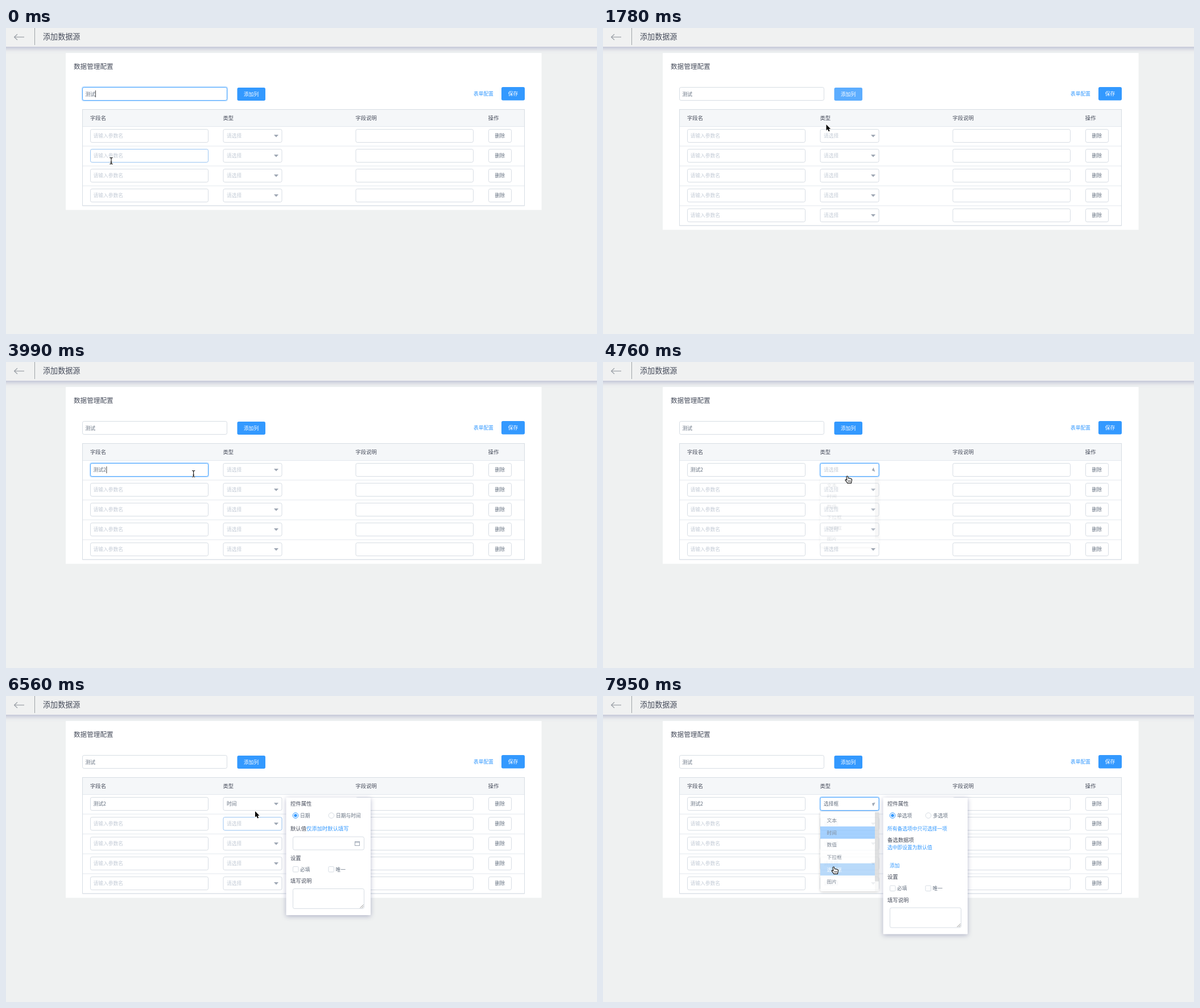
Recreate the animation shown at these times as an HTML page with a canvas. Size 1039 by 539 pixels, loop 8 s.

```html
<!DOCTYPE html>
<html lang="zh-CN">
<head>
<meta charset="utf-8">
<title>添加数据源</title>
<style>
html, body { margin: 0; width: 100%; height: 100%; overflow: hidden; background: #eff1f1; }
canvas { display: block; }
</style>
</head>
<body>
<canvas id="stage" width="1039" height="539"></canvas>
<script>
const W = 1039, H = 539, LOOP = 8000;
const screen2d = document.getElementById('stage').getContext('2d');
const layer = document.createElement('canvas');
layer.width = W;
layer.height = H;
const layer2d = layer.getContext('2d');
let g = screen2d;

const FONT = '"Noto Sans CJK SC", "Noto Sans CJK", sans-serif';
const BLUE = '#3399ff', HOVER = '#5cadff', LINE = '#d7dde4';
const TEXT = '#657180', TITLE = '#464c5b', HINT = '#c3cbd6', ARROW = '#9ea7b4';
const SMALL = 8.75, MID = 9.33;
const ITEMS = ['文本', '时间', '数值', '下拉框', '选择框', '图片'];
const ITEM_H = 22.4, MENU_TOP = 204;

// Screen refreshes: start, end, count
const REFRESH = [
  [0, 0, 1], [90, 90, 1], [290, 560, 4], [710, 1360, 8], [1510, 1510, 1],
  [1690, 2490, 10], [2570, 2660, 2], [2840, 2840, 1], [3010, 3010, 1],
  [3370, 3370, 1], [3640, 3640, 1], [3900, 4680, 10], [4760, 5490, 9],
  [5940, 6730, 10], [6820, 6900, 2], [7080, 7510, 6], [7690, 7690, 1], [7950, 7950, 1]
];

// Pointer path: time, x, y
const PATH = [
  [-100, 186, 246], [0, 185, 234], [200, 185, 234], [290, 196, 222], [380, 262, 188],
  [470, 350, 140], [560, 402, 112], [890, 424, 117], [1600, 425, 117], [1690, 415, 127],
  [1779, 392.5, 170], [1870, 386, 190], [2050, 360, 196], [2490, 312, 191],
  [3810, 312, 191], [3990, 330, 197], [4250, 385, 211], [4500, 425, 206],
  [4680, 430, 201], [4850, 430, 201], [5100, 424, 215], [5490, 414.5, 236],
  [5950, 414.5, 236], [6200, 425, 245], [6450, 436, 216], [6554, 438, 203],
  [6730, 436, 201], [6900, 432, 200], [7080, 432, 200], [7200, 428, 215],
  [7510, 407, 304], [7690, 406, 301]
];

const clamp = v => Math.max(0, Math.min(1, v));
const smooth = v => { v = clamp(v); return v * v * (3 - 2 * v); };
const inside = (p, x, y, w, h) => p.x >= x && p.x <= x + w && p.y >= y && p.y <= y + h;
const mix = (a, b, k) => {
  const ch = (s, i) => parseInt(s.slice(i, i + 2), 16);
  return `rgb(${[1, 3, 5].map(i => Math.round(ch(a, i) + (ch(b, i) - ch(a, i)) * k))})`;
};

function snap(t) {
  let shown = 0;
  for (const [a, b, n] of REFRESH) {
    if (t < a) break;
    const step = n > 1 ? (b - a) / (n - 1) : 1;
    shown = a + Math.min(n - 1, Math.floor((t - a) / step)) * step;
  }
  return shown;
}

function pointerAt(t) {
  let i = 1;
  while (i < PATH.length - 1 && PATH[i][0] < t) i++;
  const [t0, x0, y0] = PATH[i - 1], [t1, x1, y1] = PATH[i];
  const k = clamp((t - t0) / (t1 - t0));
  return { x: x0 + (x1 - x0) * k, y: y0 + (y1 - y0) * k };
}

const ramp = (t, on, off, d) => smooth((t - on) / d) - smooth((t - off) / d);
const openness = (t, d = 300) => ramp(t, 4674, 5955, d) + ramp(t, 7000, 7870, d);

function fill(x, y, w, h, color, r = 0) {
  g.fillStyle = color;
  g.beginPath();
  g.roundRect(x, y, w, h, r);
  g.fill();
}

function box(x, y, w, h, border = LINE, r = 2.7, bg = '#fff') {
  g.beginPath();
  g.roundRect(x, y, w, h, r);
  g.fillStyle = bg;
  g.fill();
  g.lineWidth = 1;
  g.strokeStyle = border;
  g.stroke();
}

function field(x, y, w, h, hover = 0, focus = false) {
  if (focus) fill(x - 1.7, y - 1.7, w + 3.4, h + 3.4, 'rgba(51,153,255,.25)', 4);
  box(x, y, w, h, focus ? '#4aa5ff' : mix(LINE, HOVER, hover));
}

function shadowed(color, blur, dy, draw) {
  g.save();
  g.shadowColor = color;
  g.shadowBlur = blur;
  g.shadowOffsetY = dy;
  draw();
  g.restore();
}

function text(s, x, cy, color = TEXT, size = SMALL, weight = 400, align = 'left') {
  g.font = `${weight} ${size}px ${FONT}`;
  g.textAlign = align;
  g.fillStyle = color;
  g.fillText(s, x, cy + size * 0.37);
  return g.measureText(s).width;
}

const strong = (s, x, cy, color = TITLE) => text(s, x, cy, color, MID, 500);

function line(x0, y0, x1, y1, color, width = 1) {
  g.strokeStyle = color;
  g.lineWidth = width;
  g.beginPath();
  g.moveTo(x0, y0);
  g.lineTo(x1, y1);
  g.stroke();
}

function poly(points, color) {
  g.fillStyle = color;
  g.beginPath();
  points.forEach(([x, y]) => g.lineTo(x, y));
  g.closePath();
  g.fill();
}

function group(alpha, draw) {
  layer2d.clearRect(0, 0, W, H);
  g = layer2d;
  draw();
  g = screen2d;
  g.globalAlpha = alpha;
  g.drawImage(layer, 0, 0);
  g.globalAlpha = 1;
}

function header() {
  fill(0, 0, W, H, '#eff1f1');
  shadowed('rgba(85,90,150,.42)', 9, 2, () => fill(-20, -20, W + 40, 53, '#f0f1f1'));
  line(14.5, 16, 32, 16, '#999fa6', 1.2);
  line(14.5, 16, 20, 11, '#999fa6', 1.2);
  line(14.5, 16, 20, 21, '#999fa6', 1.2);
  line(50.5, 0, 50.5, 30, '#a0a4a8');
  text('添加数据源', 65, 15.3, TITLE, 13.1, 500);
}

function toolbar(s) {
  const focus = s.t < 1060;
  field(134.5, 104.5, 254, 23, s.hover(134, 104, 255, 24), focus);
  text('测试', 139.5, 116.3);
  if (focus && (s.t < 380 || s.t >= 800)) line(157.5, 110, 157.5, 122, '#444');
  const lit = inside(pointerAt(s.t - 100), 406, 105, 50, 23);
  fill(406.5, 105, 49.5, 23, lit ? HOVER : BLUE, 2.7);
  text('添加列', 431.2, 116.6, '#fff', SMALL, 400, 'center');
  text('表单配置', 822, 116, BLUE);
  fill(871, 104, 41, 23.5, BLUE, 2.7);
  text('保存', 891.5, 116, '#fff', SMALL, 400, 'center');
}

function triangle(x, y, angle) {
  g.save();
  g.translate(x, y);
  g.rotate(angle);
  poly([[-4, -2], [4, -2], [0, 2.4]], ARROW);
  g.restore();
}

function nameCell(s) {
  const typed = [[2570, 'c'], [2840, 'ce'], [3010, "ce's"], [3370, '测试'], [3640, '测试2']]
    .reduce((v, [at, str]) => s.t >= at ? str : v, '');
  if (!typed) text('请输入参数名', 153.5, 190.2, HINT);
  const w = typed && text(typed, 153.5, 190.2);
  if (!s.nameFocus) return;
  line(154 + w + .5, 184, 154 + w + .5, 196, '#444');
  if (s.t >= 2570 && s.t < 3370) line(153.5, 195.3, 152.5 + w, 195.3, '#111', 1.3);
}

function row(s, i) {
  const y = 178.5 + 35 * i, cy = y + 11.6, first = i === 0;
  line(135, y + 29.5, 911, y + 29.5, '#e3e8ee');
  field(148.5, y, 207, 23, s.hover(148, y, 208, 23), first && s.nameFocus);
  if (first) nameCell(s);
  else text('请输入参数名', 153.5, cy, HINT);

  field(382, y, 103, 23, s.hover(381, y, 104, 23), first && s.menu > .05);
  const value = !first || s.t < 5940 ? '' : s.t < 7950 ? '时间' : '选择框';
  text(value || '请选择', 388, cy, value ? TEXT : HINT);
  triangle(475, cy, first ? Math.PI * openness(s.t, 200) : 0);

  field(615, y, 206.5, 23);
  box(848.5, y, 40, 23);
  text('删除', 868.3, cy, TEXT, SMALL, 400, 'center');
}

function table(s) {
  const rows = s.t < 1150 ? 4 : 5, bottom = 173 + 35 * rows;
  fill(105, 44, 836.5, bottom - 36.5, '#fff');
  strong2();
  toolbar(s);
  fill(134.5, 143, 777, 30, '#f5f7f9');
  [['字段名', 148], ['类型', 381.5], ['字段说明', 614.5], ['操作', 847.8]]
    .forEach(([label, x]) => strong(label, x, 158.5));
  line(135, 173.5, 911, 173.5, '#e3e8ee');
  for (let i = 0; i < rows; i++) row(s, i);
  g.strokeStyle = LINE;
  g.strokeRect(134.5, 143.5, 777, bottom - 143.5);
}

function strong2() {
  text('数据管理配置', 119, 67.5, TITLE, 11.6, 500);
}

function candidates(t) {
  if (t < 2660 || t >= 3370) return;
  const words = t < 2840 ? [...'才从次成出错'] : t < 3010 ? [...'测册侧策厕恻']
    : ['测试', '厕所', '', '测速', '侧四'];
  const full = t >= 3010, step = full ? 38 : 27, right = full ? 350 : 329;
  shadowed('rgba(0,0,0,.35)', 7, 2, () => fill(141, 198, right - 141, 28, '#fff', 1));
  let x = 150;
  words.forEach((word, i) => {
    text(`${i + 1}.${word}`, x, 215.8, i ? '#444' : '#000', 11.6, i ? 400 : 500);
    if (word) {
      x += step;
      return;
    }
    fill(x + 9.3, 208.5, 14, 13.5, '#1f83e6', 2.5);
    text('WC', x + 16.3, 215.4, '#fff', 6.6, 700, 'center');
    x += 30;
  });
  const ax = right - 10.7;
  poly([[ax - 2.5, 208], [ax + 2.5, 208], [ax, 205]], '#ccc');
  poly([[ax - 3, 217.5], [ax + 3, 217.5], [ax, 221]], '#111');
}

function menu(s) {
  if (s.menu <= 0) return;
  const picked = [0, ramp(s.t, 5895, 7880, 160), 0, 0, ramp(s.t, 7880, 9e3, 160), 0];
  const chosen = s.t < 5900 ? -1 : s.t < 7880 ? 1 : 4;
  group(clamp(s.menu), () => {
    g.save();
    g.translate(0, MENU_TOP);
    g.scale(1, .8 + .2 * s.menu);
    shadowed('rgba(0,0,0,.25)', 5, 1, () => fill(382, 0, 103, 145, '#fff', 2.5));
    ITEMS.forEach((label, i) => {
      const top = 4.4 + i * ITEM_H;
      if (s.hit === i) fill(382, top, 96, ITEM_H, '#f1f4f7');
      if (picked[i]) fill(382, top, 96, ITEM_H, `rgba(51,153,255,${.9 * picked[i]})`);
      text(label, 393.5, top + ITEM_H / 2, i === chosen ? '#fff' : TEXT);
    });
    fill(478, 0, 7, 145, '#f7f7f7');
    fill(478, 1, 7, 126, '#d9dadb');
    g.restore();
  });
}

function radio(x, y, on, label) {
  g.beginPath();
  g.arc(x, y, 4.8, 0, 7);
  g.fillStyle = '#fff';
  g.fill();
  g.lineWidth = 1;
  g.strokeStyle = on ? BLUE : LINE;
  g.stroke();
  if (on) {
    g.beginPath();
    g.arc(x, y, 2.8, 0, 7);
    g.fillStyle = BLUE;
    g.fill();
  }
  text(label, x + 8, y);
}

function check(x, y, label) {
  box(x - 4.5, y - 4.5, 9.5, 9.5, LINE, 1.5);
  text(label, x + 8, y + .3);
}

function panel(t) {
  const dates = t >= 5940 && t < 7080, choice = t >= 7950;
  if (!dates && !choice) return;
  const dy = choice ? 33.5 : 0;
  shadowed('rgba(70,75,130,.38)', 9, 2, () => fill(492.5, 179, 148.5, 207 + dy, '#fff', 1));
  strong('控件属性', 500, 190);
  radio(509, 210.5, true, dates ? '日期' : '单选项');
  radio(572, 210.5, false, dates ? '日期与时间' : '多选项');
  if (dates) {
    strong('默认值', 500, 234);
    strong('仅添加时默认填写', 528, 234, BLUE);
    box(504.5, 248, 125, 23);
    g.strokeStyle = ARROW;
    g.strokeRect(613.5, 256.5, 8, 7);
    line(613.5, 258, 621.5, 258, ARROW);
  } else {
    text('所有备选项中只可选择一项', 500, 234, BLUE);
    strong('备选数据项', 500, 254);
    text('选中即设置为默认值', 500, 267, BLUE);
    text('添加', 504, 298.7, BLUE);
  }
  strong('设置', 500, 285.5 + dy);
  check(509, 305 + dy, '必填');
  check(571.5, 305 + dy, '唯一');
  strong('填写说明', 500, 326 + dy);
  box(504.5, 339.5 + dy, 125, 35);
  line(622.5, 373.5 + dy, 628.5, 367.5 + dy, '#777', .8);
  line(625.5, 373.5 + dy, 628.5, 370.5 + dy, '#777', .8);
}

const ARROW_SHAPE = new Path2D('M0 0V10.6L2.4 8.4L4.2 12.4L6.1 11.6L4.4 7.7H7.6Z');
const HAND_SHAPE = new Path2D('M-2 1.2C-2 -.3 .2 -.4 .6 1L1.3 4C2 3.2 3.3 3.4 3.6 4.3' +
  'C4.4 3.7 5.5 4 5.8 4.9C6.8 4.5 7.6 5.2 7.5 6.3C7.5 9 6.6 9.8 6.4 12.4H-.4' +
  'C-1 10.3 -3 9 -3.9 7.2C-4.2 5.9 -2.6 5.6 -1.1 7.2Z');

function pointer(s) {
  const { x, y } = s.p;
  g.save();
  g.translate(x, y);
  g.lineJoin = 'round';
  if (s.kind === 'text') {
    const beam = () => {
      g.beginPath();
      g.moveTo(-2.6, -5.6);
      g.quadraticCurveTo(0, -5.6, 0, -4);
      g.lineTo(0, 4);
      g.quadraticCurveTo(0, 5.6, -2.6, 5.6);
      g.moveTo(2.6, -5.6);
      g.quadraticCurveTo(0, -5.6, 0, -4);
      g.moveTo(0, 4);
      g.quadraticCurveTo(0, 5.6, 2.6, 5.6);
      g.moveTo(-1.4, 2.4);
      g.lineTo(1.4, 2.4);
      g.stroke();
    };
    g.strokeStyle = '#fff';
    g.lineWidth = 2.4;
    beam();
    g.strokeStyle = '#111';
    g.lineWidth = 1.1;
    beam();
  } else if (s.kind === 'hand') {
    g.fillStyle = '#fff';
    g.fill(HAND_SHAPE);
    g.strokeStyle = '#111';
    g.lineWidth = 1.1;
    g.stroke(HAND_SHAPE);
    [1.1, 3, 4.9].forEach(fx => line(fx, 7.4, fx, 10.2, '#111', .8));
  } else {
    g.strokeStyle = '#fff';
    g.lineWidth = 1.8;
    g.stroke(ARROW_SHAPE);
    g.fillStyle = '#000';
    g.fill(ARROW_SHAPE);
  }
  g.restore();
}

function pointerKind(p, overMenu) {
  if (overMenu || inside(p, 406, 105, 50, 23)) return 'hand';
  if (inside(p, 134, 104, 255, 24)) return 'text';
  for (let i = 0; i < 5; i++) {
    const y = 178.5 + 35 * i;
    if (inside(p, 148, y, 208, 23)) return 'text';
    if (inside(p, 381, y, 104, 23)) return 'hand';
  }
  return 'arrow';
}

function sceneAt(t) {
  const p = pointerAt(t), before = pointerAt(t - 100), open = openness(t);
  const overMenu = open > .3 && inside(p, 382, MENU_TOP, 103, 145);
  const slot = Math.floor((p.y - MENU_TOP - 4.4) / ITEM_H);
  return {
    t, p, menu: open,
    nameFocus: t >= 2490 && t < 4640,
    hit: overMenu ? slot : -1,
    kind: pointerKind(p, overMenu),
    hover: (...r) => overMenu ? 0 : (inside(p, ...r) + inside(before, ...r)) / 2
  };
}

function draw(now) {
  const s = sceneAt(snap(now % LOOP));
  header();
  table(s);
  menu(s);
  panel(s.t);
  candidates(s.t);
  pointer(s);
}

const start = performance.now();
function tick() {
  draw(performance.now() - start);
  requestAnimationFrame(tick);
}
tick();
</script>
</body>
</html>
```
